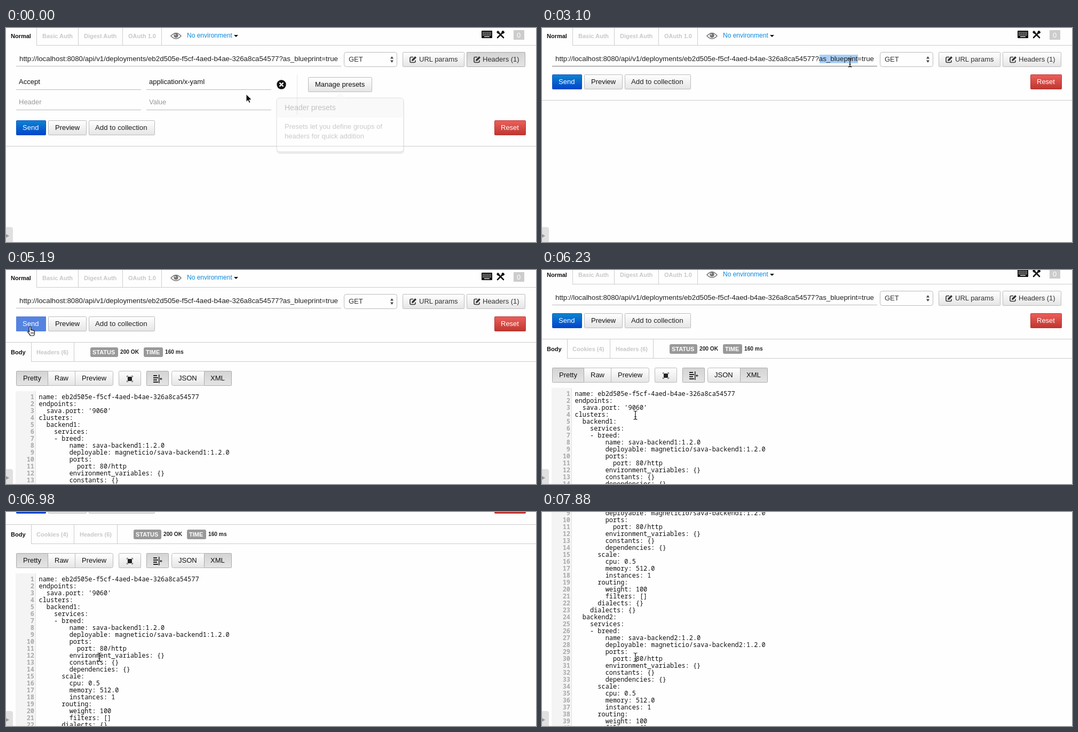
An HTML page for the animation above (8000 ms loop, 993 px wide and 401 px high).

```html
<!DOCTYPE html>
<html lang="en">
<head>
<meta charset="utf-8">
<title>REST client</title>
<style>
html, body { margin: 0; width: 100%; height: 100%; overflow: hidden; background: #fefefe; }
svg { display: block; width: 993px; height: 401px; }
text { font: 13px "Liberation Sans", Arial, sans-serif; fill: #333; white-space: pre; }
.dark { fill: #111; }
.white { fill: #fff; }
.hint { fill: #999; }
.url { font-size: 13.3px; fill: #222; }
.tab { font-size: 11px; font-weight: bold; fill: #111; }
.off { fill: #c8c8c8; }
.badge { font-size: 11px; font-weight: bold; fill: #fff; }
.value { font-size: 10.2px; font-weight: bold; fill: #222; }
.env { font-size: 12px; fill: #0a8ae0; }
.code { font: 11.917px "Noto Sans Mono", monospace; fill: #111; }
.num { font-weight: bold; fill: #aaa; text-anchor: end; }
</style>
</head>
<body>
<svg id="stage" viewBox="0 0 993 401"></svg>
<script>
const rect = (x, y, w, h, fill, more = '') =>
  `<rect x="${x}" y="${y}" width="${w}" height="${h}" fill="${fill}" ${more}/>`;
const text = (s, x, y, cls = '') => `<text x="${x}" y="${y}" class="${cls}">${s}</text>`;
const path = (d, fill = '#111', more = '') => `<path d="${d}" fill="${fill}" ${more}/>`;
const group = (id, content, more = '') => `<g id="${id}" ${more}>${content}</g>`;
const box = (x, y, w, fill, stroke, rx = 1, more = '') =>
  rect(x + .5, y + .5, w - 1, 27, fill, `stroke="${stroke}" rx="${rx}" ${more}`);
const button = (x, y, w, label, lx, fill = 'url(#plain)', stroke = '#bbb', cls = 'dark') =>
  box(x, y, w, fill, stroke) + text(label, lx, y + 18, cls);
const gradient = (id, from, to) => `<linearGradient id="${id}" x2="0" y2="1">
  <stop stop-color="${from}"/><stop offset="1" stop-color="${to}"/></linearGradient>`;
const pressed = (x, y, w, id = '') => box(x, y, w, 'url(#down)', '#aaa', 1, id);
const editIcon = x => path(`M${x + 7} 54.5h-4q-2 0-2 2v6q0 2 2 2h6q2 0 2-2v-2`, 'none',
  'stroke="#333" stroke-width="1.6"') + path(`M${x + 4} 62l.5-3 6-6 2.5 2.5-6 6z`, '#333');

const block = n => `  backend${n}:
    services:
    - breed:
        name: sava-backend${n}:1.2.0
        deployable: magneticio/sava-backend${n}:1.2.0
        ports:
          port: 80/http
        environment_variables: {}
        constants: {}
        dependencies: {}
      scale:
        cpu: 0.5
        memory: 512.0
        instances: 1
      routing:
        weight: 100
        filters: []
      dialects: {}
    dialects: {}`;
const yaml = `name: eb2d505e-f5cf-4aed-b4ae-326a8ca54577
endpoints:
  sava.port: '9060'
clusters:
${block(1)}
${block(2)}`;

function toolbar() {
  const tabs = [['Normal', 9, 57], ['Basic Auth', 68, 135], ['Digest Auth', 146, 218], ['OAuth 1.0', 229, 291]];
  let keys = '';
  for (let i = 0; i < 21; i++) keys += rect(893 + i % 7 * 2.4, 7.5 + (i / 7 | 0) * 2.6, 1.3, 1.3, '#fff');
  return tabs.map(([name, x, edge], i) =>
      text(name, x, 19, i ? 'tab off' : 'tab') + rect(edge, 0, 1, 32, '#ccc')).join('')
    + rect(57, 32, 936, 1, '#ccc')
    + path('M309 15q9.500-11 19 0q-9.500 10-19 0z', 'none', 'stroke="#777" stroke-width="1.6"')
    + '<circle cx="318.500" cy="14" r="4.300" fill="#777"/><circle cx="317" cy="12.500" r="1.300" fill="#ddd"/>'
    + text('No environment', 339, 18, 'env') + path('M427 13h8l-4 4z')
    + rect(891, 5, 20, 14, '#111', 'rx="1"') + keys + rect(896, 15.500, 10, 1.300, '#fff')
    + path('M921 7l11 11M932 7l-11 11', 'none', 'stroke="#111" stroke-width="2.6" stroke-linecap="round"')
    + path('M919 8l3-3 3 3-3 3zM928 8l2-3h2l-1 3 3-1v2l-3 2z')
    + rect(951, 4, 20, 18, '#ccc') + text('0', 957, 18, 'white" font-weight="bold');
}

function request() {
  return group('selection', rect(520, 50, 72, 16, '#a9cff8'))
    + text('http://localhost:8080/api/v1/deployments/eb2d505e-f5cf-4aed-b4ae-326a8ca54577?as_blueprint=true', 25, 62, 'url')
    + rect(19, 71, 609, 1, '#bbb', 'id="underline"')
    + box(633, 45, 100, '#fefefe', '#bbb', 4) + text('GET', 642, 63, 'get')
    + path('M720 57.500h6l-3-4.500zM720 60.500h6l-3 4.500z', '#444')
    + button(743, 45, 116, 'URL params', 774, undefined, undefined, '') + editIcon(756)
    + box(863, 45, 110, 'url(#plain)', '#bbb') + pressed(863, 45, 110, 'id="headersDown"')
    + text('Headers (1)', 893, 63) + editIcon(876);
}

function headerPanel() {
  const row = (y, cls, key, value) => text(key, 24, y, cls) + text(value, 268, y, cls)
    + rect(19, y + 10, 234, 1, '#bbb') + rect(263, y + 10, 234, 1, '#bbb');
  return row(105, 'dark', 'Accept', 'application/x-yaml') + row(143, 'hint', 'Header', 'Value')
    + '<circle cx="516" cy="106" r="8.700" fill="#111"/>'
    + path('M512.500 102.500l7 7M519.500 102.500l-7 7', 'none', 'stroke="#fff" stroke-width="2.400"')
    + rect(545, 87, 1, 76, '#e6e6e6') + button(566, 92, 120, 'Manage presets', 579);
}

function tooltip() {
  return rect(507, 134, 239, 102, '#777', 'rx="6" opacity=".5"')
    + rect(507, 131, 238, 101, '#fff', 'rx="6" stroke="#777"')
    + rect(508, 132, 236, 36, '#eee', 'rx="5"')
    + path('M616 131l10-10 10 10z', '#eee')
    + text('Header presets', 522, 154, 'dark" style="font-size:14px')
    + text('Presets let you define groups of', 522, 189)
    + text('headers for quick addition', 522, 207);
}

function actions() {
  return button(19, 87, 56, 'Send', 31, 'url(#blue)', '#0a50c0', 'white')
    + group('sendHover', button(19, 87, 56, 'Send', 31, '#5583e0', '#5583e0', 'white'))
    + button(79, 87, 72, 'Preview', 92) + button(155, 87, 124, 'Add to collection', 167, undefined, undefined, 'url')
    + button(915, 87, 59, 'Reset', 927, 'url(#red)', '#b93530', 'white')
    + rect(0, 135, 993, 1, '#ccc');
}

function response() {
  const badge = (x, w, label) => rect(x, 145, w, 18, '#999', 'rx="3"') + text(label, x + 4, 158, 'badge');
  const lines = yaml.split('\n').map((line, i) =>
    text(i + 1, 53, 242 + i * 13, 'code num') + text(line, 61.500, 242 + i * 13, 'code')).join('');
  return text('Body', 9, 158, 'tab') + rect(47, 136, 1, 35, '#ccc') + rect(47, 171, 946, 1, '#ccc')
    + group('cookies', text('Cookies (4)', 57, 158, 'tab off') + rect(127, 136, 1, 35, '#ccc'))
    + group('status', text('Headers (6)', 57, 158, 'tab off') + rect(127, 136, 1, 35, '#ccc')
      + badge(158, 52, 'STATUS') + text('200 OK', 214, 157, 'value')
      + badge(258, 36, 'TIME') + text('160 ms', 298, 157, 'value'))
    + box(19, 189, 182, 'url(#plain)', '#bbb', 3) + pressed(19, 189, 60) + rect(129, 190, 1, 26, '#bbb')
    + text('Pretty', 32, 207, 'dark') + text('Raw', 91, 207, 'dark') + text('Preview', 142, 207, 'dark')
    + box(211, 189, 42, 'url(#plain)', '#bbb') + rect(228, 200, 8, 8, '#222')
    + path('M226.500 201v-2.500h2.500M235 198.500h2.500v2.500M237.500 207v2.500h-2.500M229 209.500h-2.500v-2.500', 'none', 'stroke="#555"')
    + pressed(263, 189, 42)
    + path('M276 197h7v2h-7zM276 201h9v2h-9zM276 205h7v2h-7zM276 209h9v2h-9zM286 196h1.500v16h-1.500zM288 204l3-2.500v2h2v1h-2v2z', '#222')
    + box(310, 189, 113, 'url(#plain)', '#bbb', 3) + pressed(371, 189, 52)
    + text('JSON', 323, 207, 'dark') + text('XML', 383, 207, 'dark')
    + rect(18, 227, 38, 600, '#f4f4f4') + rect(55, 227, 1, 600, '#e2e2e2') + lines;
}

const cursors =
  group('arrow', path('M0 0V14.500L3.300 11.500 5.500 16.500 8 15.400 5.900 10.500H10.500Z', '#111', 'stroke="#fff"'))
  + group('hand', path('M-1.500 1q1.500-2 3 0V6.500q1.500-1 2.500.5q1.500-1 2.500.7q1.800-.6 2 1.300V12q0 3-1.500 5H.5q-1-3-4.500-6q-1-2.500 1.500-2l1 1z', '#fff', 'stroke="#111" stroke-width="1.200"')
    + path('M2 10v4M4.200 10v4M6.300 10v4', 'none', 'stroke="#111" stroke-width=".8"'))
  + group('beam', path('M-3.500-8q3 0 3.500 1.500q.5-1.500 3.500-1.500M0-7V7M-3.500 8q3 0 3.500-1.500q.5 1.500 3.500 1.500M-2 3h4', 'none', 'stroke="#111" stroke-width="1.200"'));

document.getElementById('stage').innerHTML =
  `<defs>${gradient('plain', '#fff', '#e5e5e5')}${gradient('down', '#d4d4d4', '#e4e4e4')}
   ${gradient('blue', '#0a84d0', '#0444cc')}${gradient('red', '#ee5f5b', '#bd362f')}</defs>`
  + group('page', toolbar() + request() + group('panel', headerPanel()) + group('actions', actions())
    + group('response', response()) + group('tip', tooltip()))
  + path('M0 373h9q4 0 4 4v24h-13z', '#e0e0e0') + path('M0 386l6 3.500-6 3.500z', '#999') + cursors;

const LOOP = 8000, STEP = 148.2;
// time, pointer shape, x, y
const moves = [
  [0, 'arrow', 450, 124], [140, 'arrow', 436, 127], [590, 'beam', 210, 134], [1030, 'arrow', 42, 158],
  [1180, 'arrow', 24, 171], [1480, 'arrow', 260, 160], [1770, 'hand', 790, 66], [1920, 'hand', 871, 59],
  [2370, 'hand', 871, 59], [2660, 'beam', 624, 66], [2950, 'beam', 577, 65], [3560, 'beam', 577, 65],
  [4000, 'arrow', 360, 84], [4440, 'hand', 60, 104], [4590, 'hand', 45, 106], [5300, 'hand', 45, 106],
  [5400, 'arrow', 70, 135], [5620, 'beam', 150, 245], [5770, 'beam', 174, 271], [5920, 'beam', 174.500, 272],
  [LOOP, 'beam', 174.500, 272]];
const scrolls = [[0, 0], [6230, 6], [6380, 24], [6530, 52], [6680, 66], [6980, 112], [7130, 184],
  [7280, 228], [7730, 288], [7880, 340]];

const el = id => document.getElementById(id);
const show = (id, on) => el(id).style.display = on ? '' : 'none';
const place = (id, x, y) => el(id).setAttribute('transform', `translate(${x} ${y})`);

function drawPointer(t) {
  const time = Math.floor((t + 12) / STEP) * STEP;
  const i = Math.max(0, moves.findIndex(m => m[0] > time) - 1);
  const [from, shape, x, y] = moves[i], [to, , nextX, nextY] = moves[i + 1];
  const k = Math.min(1, (time - from) / (to - from));
  for (const id of ['arrow', 'hand', 'beam']) show(id, id === shape);
  place(shape, Math.round(x + (nextX - x) * k), Math.round(y + (nextY - y) * k));
}

function draw() {
  const t = performance.now() % LOOP;
  const panelOpen = t < 2370, cookies = t >= 5340;
  el('tip').style.opacity = t < 140 ? .25 : t < 290 ? .1 : 0;
  show('panel', panelOpen);
  show('headersDown', panelOpen);
  place('actions', 0, panelOpen ? 86 : 0);
  show('selection', t >= 3100 && t < 4750);
  el('underline').setAttribute('fill', t >= 2960 && t < 4750 ? '#777' : '#bbb');
  show('sendHover', t >= 4440 && t < 5340);
  show('response', t >= 4900);
  show('cookies', cookies);
  place('status', cookies ? 81 : 0, 0);
  place('page', 0, -scrolls.findLast(s => s[0] <= t)[1]);
  drawPointer(t);
  requestAnimationFrame(draw);
}
draw();
</script>
</body>
</html>
```
